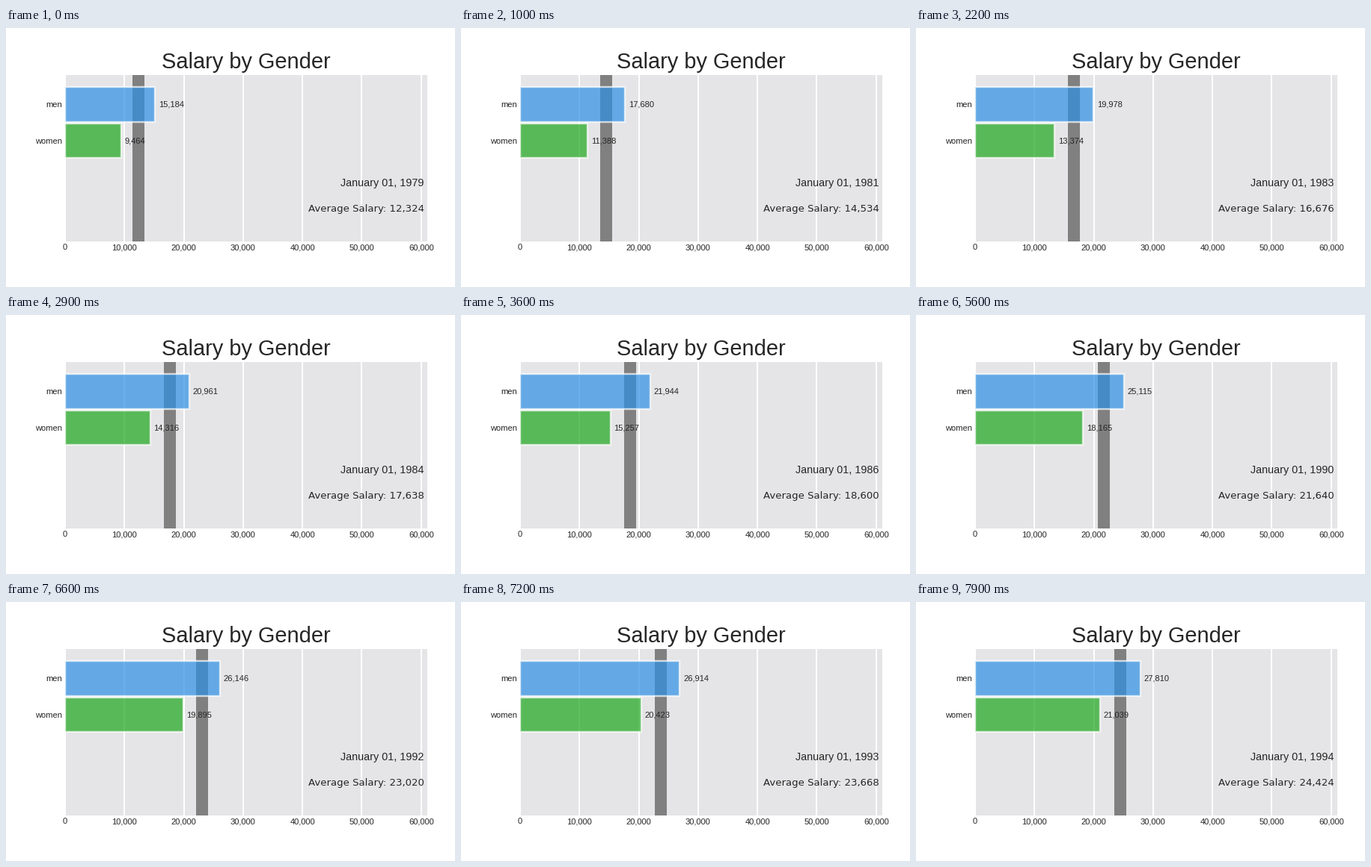
These frames come from a looping animation (600x347 px, 8 s). A matplotlib script:

```python
import matplotlib.pyplot as plt
import numpy as np
from matplotlib.animation import FuncAnimation

W, H, DPI = 600, 347, 100
STEPS, FRAMES, INTERVAL = 5, 80, 100
FIRST_YEAR, WEEKS = 1979, 52
INK = "0.15"

# Turning points of weekly pay; salaries rise in straight runs between them
YEARS = [0, 2, 3, 4.4, 7.2, 9.2, 11, 13.2, 15.8]
MEN = [292, 340, 364, 384.2, 422, 452.8, 481, 502.8, 534.8]
WOMEN = [182, 219, 239, 257.2, 293.4, 317.6, 346, 382.6, 404.6]

plt.rcParams.update({
    "font.family": "Liberation Sans",
    "text.color": INK,
    "xtick.color": INK,
    "ytick.color": INK,
})


def px(pixels):
    """Pixels to points."""
    return pixels * 72 / DPI


fig = plt.figure(figsize=(W / DPI, H / DPI), dpi=DPI, facecolor="white")

left, right, top, bottom = 79, 562.7, 63.3, 286
ax = fig.add_axes([left / W, 1 - bottom / H, (right - left) / W, (bottom - top) / H],
                  facecolor="#e5e4e6")
ax.set_xlim(0, 61000)
ax.set_ylim(3.777, -0.806)
ax.set_title("Salary by Gender", fontsize=20.9, pad=6.6)
ax.set_xticks(range(0, 60001, 10000))
ax.xaxis.set_major_formatter("{x:,.0f}")
ax.set_yticks([0, 1], ["men", "women"])
ax.tick_params(length=0, pad=3, labelsize=8)
ax.tick_params(axis="x", pad=2.4)
ax.set_axisbelow(True)
ax.grid(axis="x", color="white", lw=px(2))
for spine in ax.spines.values():
    spine.set_visible(False)

mean_line = ax.axvline(0, color="0.5", lw=px(16), zorder=0.4)
bars = ax.barh([0, 1], [0, 0], height=0.95, color=["#2E91E5", "#1CA71C"],
               ec="white", lw=px(2.4), alpha=0.7, zorder=2)
values = [ax.text(0, y, "", fontsize=8, va="center", zorder=4) for y in (0, 1)]
corner = dict(transform=ax.transAxes, ha="right", va="center")
date = ax.text(0.991, 0.35, "", fontsize=10.37, **corner)
summary = ax.text(0.992, 0.197, "", fontsize=9.5, family="DejaVu Sans", **corner)


def update(frame):
    t = frame / STEPS
    pay = [WEEKS * np.interp(t, YEARS, weekly) for weekly in (MEN, WOMEN)]
    mean = sum(pay) / 2
    for bar, label, value in zip(bars, values, pay):
        bar.set_width(value)
        label.set_x(value + 580)
        label.set_text(f"{value:,.0f}")
    mean_line.set_xdata([mean, mean])
    date.set_text(f"January 01, {FIRST_YEAR + frame // STEPS}")
    summary.set_text(f"Average Salary: {mean:,.0f}")
    return [*bars, *values, mean_line, date, summary]


anim = FuncAnimation(fig, update, frames=FRAMES, interval=INTERVAL,
                     repeat=True, repeat_delay=0)
plt.show()
```
